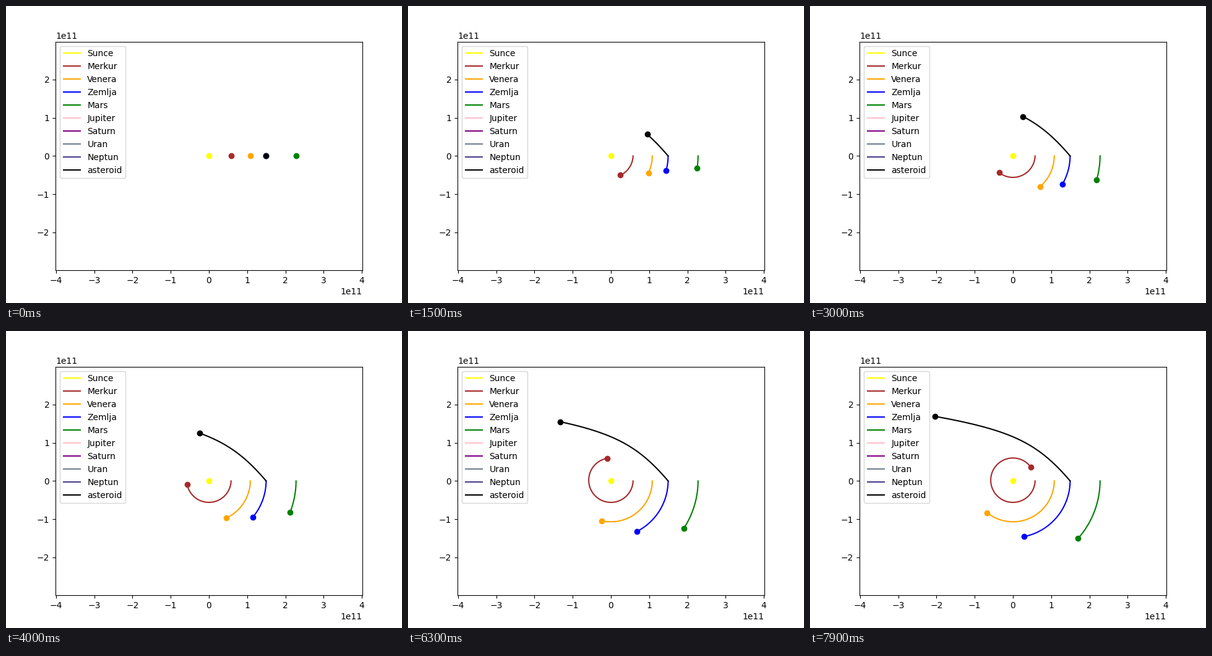
Animation of 640x480 px, one loop 8 s. Source, as a matplotlib script:

```python
import numpy as np
import matplotlib.pyplot as plt
from matplotlib.animation import FuncAnimation

GM = 6.67408e-11 * 1.989e30
AU = 1.496e11
DAY = 86400.0
DAYS = 80

TILT = np.radians(130)
# name, colour, start distance on the x axis (m), start velocity (m/s)
BODIES = [
    ("Sunce", "yellow", 0.0, (0, 0)),
    ("Merkur", "brown", 57.9e9, (0, -47.89e3)),
    ("Venera", "orange", 108.2e9, (0, -35.03e3)),
    ("Zemlja", "blue", AU, (0, -29.79e3)),
    ("Mars", "green", 227.9e9, (0, -24.13e3)),
    ("Jupiter", "pink", 778.6e9, (0, -13.06e3)),
    ("Saturn", "purple", 1433.5e9, (0, -9.64e3)),
    ("Uran", "slategray", 2872.5e9, (0, -6.81e3)),
    ("Neptun", "darkslateblue", 4495.1e9, (0, -5.43e3)),
    ("asteroid", "black", AU, (58e3 * np.cos(TILT), 58e3 * np.sin(TILT))),
]


def orbit(distance, velocity):
    """Daily positions around the Sun, semi-implicit Euler steps."""
    pos, vel = np.array([distance, 0.0]), np.array(velocity, float)
    path = [pos.copy()]
    for _ in range(DAYS - 1):
        if distance:
            vel -= GM * pos / np.hypot(*pos) ** 3 * DAY
        pos += vel * DAY
        path.append(pos.copy())
    return np.array(path)


fig, ax = plt.subplots(figsize=(6.4, 4.8), dpi=100)
y_max = 2 * AU
x_max = y_max * 496 / 369.6
ax.set_xlim(-x_max, x_max)
ax.set_ylim(-y_max, y_max)

tracks = []
for name, color, distance, velocity in BODIES:
    trail, = ax.plot([], [], color=color, label=name)
    dot, = ax.plot([], [], "o", color=color)
    tracks.append((orbit(distance, velocity), trail, dot))
ax.legend(loc="upper left")


def update(day):
    for path, trail, dot in tracks:
        trail.set_data(*path[:day + 1].T)
        dot.set_data(*path[day:day + 1].T)
    return [artist for _, *pair in tracks for artist in pair]


anim = FuncAnimation(fig, update, frames=DAYS, interval=100,
                     repeat=True, repeat_delay=0, blit=False)
plt.show()
```
